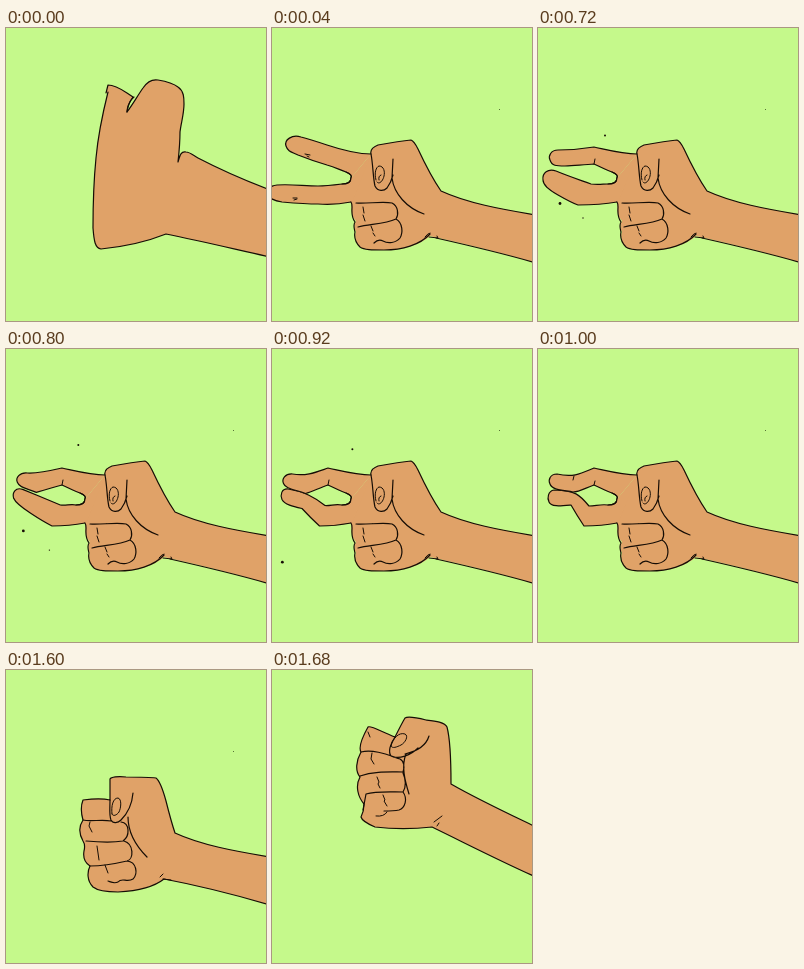
Animation of 260x293 px, one loop 1760 ms. Source, as an HTML page:

```html
<!DOCTYPE html>
<html lang="en">
<head>
<meta charset="utf-8">
<title>Hand loop</title>
<style>
  html, body { margin: 0; width: 100%; height: 100%; overflow: hidden; background: #c5f98b; }
  svg { display: block; width: 100%; height: 100%; }
  path { fill: none; stroke: #160d05; stroke-width: 1.2; stroke-linecap: round; stroke-linejoin: round; }
  .skin { fill: #e0a268; }
  .bare { stroke: none; }
  .thin { stroke-width: 1; }
  g { visibility: hidden; }
</style>
</head>
<body>
<svg viewBox="0 0 260 293" preserveAspectRatio="none">
  <g id="blank">
    <path class="skin" d="M100 65L102 57C108 57 115 61 121 65L127 69C124 73 121 78 121 84C127 76 132 67 137 60C141 54 146 51 152 52C158 53 167 55 172 59C178 63 178 70 178 76C178 86 175 95 174 104C174 115 173 125 172 134C174 127 175 123 180 124C184 124 188 128 192 130C215 142 238 152 264 162L264 229C228 221 195 213 160 206C140 214 115 219 95 221C89 220 88 213 87 200C87 175 88 150 90 130C92 108 96 88 102 64"/>
    <path d="M121 84C122 77 124 72 128 69"/>
  </g>

  <g id="sign">
    <path id="lower" class="skin"/>
    <path id="upper" class="skin"/>
    <path class="skin bare" d="M99 126L79 150L79 174L81 180L110 190L125 130Z"/>
    <path d="M74 144C79 146 80 148 79 150C79 154 76 156 70 156"/>
    <path class="skin bare" d="M99 126C98 122 101 119 106 117C117 115 128 113 139 112C142 113 144 117 146 121C153 136 160 150 169 163C195 175 228 181 264 187L264 235C230 225 195 216 158 208C148 217 130 222 112 222C100 222 92 222 88 219C84 215 82 209 84 204C82 200 82 196 84 193C79 188 79 181 80 174Z"/>
    <path d="M99 126C98 122 101 119 106 117C117 115 128 113 139 112C142 113 144 117 146 121C153 136 160 150 169 163C195 175 228 181 264 187M264 235C230 225 195 217 164 210M158 206C148 217 130 222 112 222C100 222 92 222 88 219C84 215 82 209 83 204C82 200 81 197 83 194M79 174C82 178 77 186 83 194"/>
    <path d="M99 126C101 136 101 150 103 158C106 164 112 163 115 160C118 156 120 151 121 147M121 131L120 150C122 166 135 180 152 186"/>
    <path d="M84 175C95 176 110 173 120 175C126 178 127 186 124 191C113 196 98 196 86 199M124 191C131 195 131 205 128 210C124 215 116 216 111 213C107 211 104 213 102 215"/>
    <path class="thin" d="M104 152C102 145 104 139 107 138C112 138 113 144 112 148C111 153 107 157 105 154M107 152Q106 148 109 147M91 179L92 185M91 187L93 193M99 198L101 203M101 205L103 208M153 209Q156 205 158 205M157 209L166 210L165 208"/>
    <path id="joint" class="thin"/>
  </g>

  <g id="fist">
    <path class="skin" d="M104 109C105 107 112 106 120 107C132 107 143 107 150 108C154 111 157 120 160 131C163 143 166 154 169 163C195 175 228 181 264 187L264 235C230 225 195 216 158 209C148 217 130 221 112 222C100 222 92 221 87 217C81 211 81 202 84 196C79 193 77 187 78 181C79 177 79 174 77 171C73 164 73 156 77 150C75 143 75 135 77 130C85 129 95 128 104 130Z"/>
    <path d="M104 130C104 138 103 145 105 150C107 154 112 153 115 150C121 144 126 135 127 123M77 150C85 152 95 149 105 151M115 152C124 153 124 166 117 171C105 173 91 172 80 171M118 171C128 174 128 189 121 191C108 194 95 196 84 196M121 191C131 192 132 204 127 209C121 213 116 207 112 212C108 214 105 212 102 211M122 147C122 165 132 178 141 187"/>
    <path class="thin" d="M106 144C105 136 107 128 112 128C116 129 115 138 113 142C111 145 107 147 106 144M84 152L83 156L86 162M91 176L92 183L93 190M99 195L102 203M157 209L165 210M154 207L157 204"/>
  </g>

  <g id="raised">
    <path class="skin" d="M123 67C126 61 130 53 133 48C136 46 146 48 154 50C163 51 173 52 175 57C179 72 179 95 179 114C205 129 235 143 264 157L264 207C230 192 197 175 160 157C142 159 120 159 103 157C96 154 90 151 89 147C91 143 92 138 92 134C86 127 83 116 88 107C83 101 84 91 89 82C86 77 91 66 96 57C98 55 108 61 123 67"/>
    <path d="M123 67C118 74 116 82 119 86C127 90 139 85 146 78M157 66C154 76 146 81 133 84M134 84C129 96 133 111 137 124M89 82C102 79 116 85 128 89C132 91 133 97 131 102C117 102 102 101 88 106M131 103C134 110 134 117 131 122C118 122 104 121 94 124L91 140M131 122C136 129 133 138 127 140C122 141 116 141 112 141"/>
    <path class="thin" d="M119 76C121 68 127 62 133 64C137 66 133 73 129 75C125 77 120 79 119 76M96 62L98 67M100 83L99 89L102 94M105 107L107 112L106 114L108 118M111 125L113 130L112 131L115 136M162 152L170 146M165 156L167 153M104 146Q112 147 115 142"/>
  </g>

  <g id="dots" fill="#160d05">
    <circle r="1"/><circle r="1.4"/><circle r=".7"/>
  </g>
  <g id="speck"><circle cx="227.5" cy="81.5" r=".5" fill="#33451d"/></g>
</svg>
<script>
const LOOP = 1760;
const el = id => document.getElementById(id);
const crotch = "C63 139 68 142 74 144C79 146 80 148 79 150";
const knuckle = "M99 126C85 126 70 122 56 119";
const web = "M79 150C79 155 74 156 70 156";

// Matching commands in each pose, so the numbers can be blended.
const poses = {
  spread: {
    upper: "M99 126C85 126 70 122 55 117C46 114 37 111 29 109C20 106 12 112 14 118C16 124 20 124 26 127C36 131 45 134 55 137" + crotch,
    lower: web + "C62 157 54 158 46 158C32 158 20 156 5 157C-3 158 -6 162 -4 167C-2 171 3 173 10 174C22 175 36 176 46 176C58 177 69 176 79 174",
    joint: "M33 126L38 127M35 128L37 129M21 170L25 170M22 172L25 171"
  },
  bent: {
    upper: knuckle + "C44 121 30 122 20 122C13 122 10 128 12 132C14 138 18 138 27 138C38 137 47 137 56 136" + crotch,
    lower: web + "C65 156 60 157 53 156C42 152 30 148 18 143C10 140 4 145 5 152C5 157 11 162 20 167C27 171 34 175 40 177C55 177 68 176 79 174",
    joint: "M57 131L56 136"
  },
  touch: {
    upper: knuckle + "C45 122 33 126 22 125C14 124 9 129 11 134C13 139 22 140 32 146C38 143 47 139 56 136" + crotch,
    lower: web + "C64 154 60 157 55 156C44 151 28 144 16 139C9 137 7 143 9 148C12 153 20 158 27 163C34 168 42 173 49 177C60 177 69 176 79 174",
    joint: "M57 131L56 136"
  },
  pinch: {
    upper: knuckle + "C44 124 36 129 19 125C12 125 10 131 12 135C14 141 24 141 35 143C42 143 47 139 56 136" + crotch,
    lower: web + "C62 155 58 157 51 157C41 145 38 142 16 141C10 142 9 149 11 153C13 158 22 157 33 156C37 163 42 171 46 177C58 177 69 176 79 174",
    joint: "M57 132L56 136M36 127L35 131"
  }
};

function blend(a, b, k) {
  const to = b.match(/-?\d+/g);
  let i = 0;
  return a.replace(/-?\d+/g, n => (+n + (to[i++] - n) * k).toFixed(2));
}

function setFingers(a, b, k) {
  for (const part of ["upper", "lower"])
    el(part).setAttribute("d", blend(a[part], b[part], k));
  el("joint").setAttribute("d", k < 1 ? a.joint : b.joint);
}

// x, y, speed x, speed y, last step
const flights = [
  [67, 107.5, 2.67, -8.67, 5],
  [22, 175.5, -2.33, .33, 5],
  [45, 190, -.8, 2.67, 4]
];
const dots = [...el("dots").children];

function setDots(step) {
  flights.forEach(([x, y, vx, vy, end], i) => {
    dots[i].setAttribute("cx", x + vx * step);
    dots[i].setAttribute("cy", y + vy * step + 1.44 * step * step);
    dots[i].style.display = step > end ? "none" : "";
  });
}

const show = (id, on) => el(id).style.visibility = on ? "visible" : "hidden";

function draw(now) {
  const t = now % LOOP;
  show("blank", t < 40);
  show("sign", t >= 40 && t < 1600);
  show("fist", t >= 1600 && t < 1680);
  show("raised", t >= 1680);
  show("speck", t >= 40 && t < 1680);
  show("dots", t >= 720 && t < 1000);

  const { spread, bent, touch, pinch } = poses;
  let step = Math.floor((t - 720) / 40);
  if (step === 1) step = 0; // the bent pose holds for two steps
  if (step < 0) setFingers(spread, spread, 0);
  else if (step < 3) setFingers(bent, touch, step / 3);
  else setFingers(touch, pinch, Math.min(1, (step - 3) / 4));
  setDots(Math.max(0, step));
}

const start = performance.now();
function tick() {
  draw(performance.now() - start);
  requestAnimationFrame(tick);
}
tick();
</script>
</body>
</html>
```
